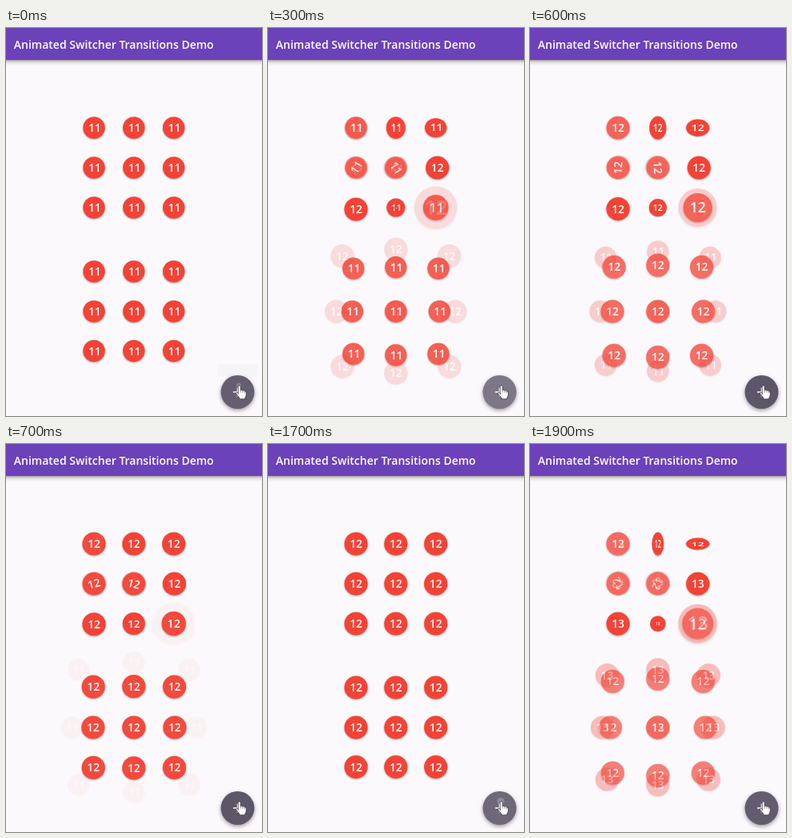
These frames come from a looping animation (320 by 486 pixels, 2000 ms). An HTML page:

```html
<!DOCTYPE html>
<html lang="en">
<head>
<meta charset="utf-8">
<title>Animated Switcher Transitions Demo</title>
<style>
  html, body { margin: 0; width: 100%; height: 100%; overflow: hidden; background: #fbf9fc; }
  svg { display: block; width: 320px; height: 486px; }
  text { font-family: "Open Sans", "Noto Sans", sans-serif; font-weight: 600; fill: #fff; }
  .num { font-size: 13.8px; text-anchor: middle; }
  .disc { fill: #f44336; filter: drop-shadow(0 1px 1px rgba(0, 0, 0, .32)); }
</style>
</head>
<body>
<svg viewBox="0 0 320 486">
  <defs>
    <linearGradient id="shade" x2="0" y2="1">
      <stop offset="0" stop-color="#000" stop-opacity=".34"/>
      <stop offset=".45" stop-color="#000" stop-opacity=".1"/>
      <stop offset="1" stop-color="#000" stop-opacity="0"/>
    </linearGradient>
  </defs>
  <rect width="320" height="486" fill="#fbf9fc"/>
  <rect y="40" width="320" height="7" fill="url(#shade)"/>
  <rect width="320" height="40" fill="#6b42b9"/>
  <text x="9.8" y="26" font-size="14">Animated Switcher Transitions Demo</text>
  <g id="cells"></g>
  <rect id="tip" x="264" y="421" width="51" height="16" rx="2" fill="#4a5a4a" opacity=".03"/>
  <circle cx="289.5" cy="456" r="21" fill="#5d5568" style="filter:drop-shadow(0 2px 2.5px rgba(0,0,0,.38))"/>
  <circle id="glow" cx="289.5" cy="456" r="21" fill="#fff"/>
  <circle id="ripple" cx="291" cy="447.5" fill="#fff"/>
  <path d="M284 456h11M289.5 450.5v11" stroke="#fff" stroke-width="1.6"/>
  <path d="M290.2 458.5V449.3q0-1.6 1.5-1.6t1.5 1.6V453.4q2.2-.7 2.7.6 2-.5 2.4.8 1.9-.2 1.9 1.5v3.2q0 2-1.4 3.6v1.7h-7v-1.5l-4.2-5.2q-.6-1.4.5-1.8 1-.2 2.1 1.2z"
    fill="#fff" stroke="#3a3444" stroke-width=".8" stroke-linejoin="round"/>
  <path d="M293.2 453.6v3M295.9 454.2v2.6M298.3 455v2.2" stroke="#3a3444" stroke-width=".6"/>
</svg>
<script>
const LOOP = 2000, STEP = 100, SECOND_TAP = 1700;
const COLS = [110, 159.8, 209.7], ROWS = [125, 175, 225, 305, 355, 404.5];
const PROGRESS = [[200, 0], [300, .16], [400, .4], [600, .76], [700, .96], [800, 1]];
const PROGRESS_2 = [[1700, 0], [1800, .14], [1900, .33]];
const GLOW = [[0, .05], [200, .1], [300, .2], [400, 0], [1600, 0], [1700, .11], [1800, .18], [1900, .04]];
const RIPPLE = [[0, 3], [200, 5], [300, 0], [1600, 0], [1700, 4.5], [1800, 9], [1900, 0]];

const $ = id => document.getElementById(id);
const { PI, sin, cos, abs } = Math;

function make(tag, parent, attrs = {}) {
  const el = document.createElementNS("http://www.w3.org/2000/svg", tag);
  for (const k in attrs) el.setAttribute(k, attrs[k]);
  return parent.appendChild(el);
}

function track(keys, t) {
  const i = keys.findIndex(k => k[0] >= t);
  if (i < 0) return keys[keys.length - 1][1];
  if (i === 0) return keys[0][1];
  const [t0, a] = keys[i - 1], [t1, b] = keys[i];
  return a + (b - a) * (t - t0) / (t1 - t0);
}

// Each effect maps visibility v (0 hidden, 1 at rest) to a pose; isNew marks the incoming disc.
const fade = v => ({ alpha: v });
const flip = axis => (v, isNew) => {
  const s = abs(cos(PI * v));
  return { alpha: isNew ? +(v >= .5) : +(v > .5), sx: axis ? 1 : s, sy: axis ? s : 1 };
};
const spin = dir => v => ({ alpha: v, turn: dir * 360 * v });
const shake = (dx, dy) => (v, isNew) => {
  const s = 2 * sin(3 * PI * v);
  return { alpha: isNew ? +(v > 0) : +(v === 1), x: dx * s, y: dy * s };
};
const scale = v => ({ sx: v, sy: v });
const zoom = v => ({ alpha: v, sx: 2 - v, sy: 2 - v });
const slide = (dx, dy) => {
  const k = dx && dy ? .7 : 1;
  return v => ({ alpha: v, x: dx * 29 * k * (1 - v), y: dy * 33 * k * (1 - v) });
};

const effects = [fade, flip(0), flip(1), spin(1), spin(-1), shake(1, 0), shake(0, 1), scale, zoom];
for (const dy of [-1, 0, 1])
  for (const dx of [-1, 0, 1]) effects.push(dx || dy ? slide(dx, dy) : fade);

function makeDisc(parent) {
  const g = make("g", parent);
  return { g, disc: make("circle", g, { class: "disc" }), label: make("text", g, { class: "num", y: 5 }) };
}

const cells = effects.map((effect, i) => {
  const x = COLS[i % 3], y = ROWS[Math.floor(i / 3)];
  const g = make("g", $("cells"), { transform: `translate(${x} ${y})` });
  return { effect, before: makeDisc(g), after: makeDisc(g) };
});

function pose(d, n, { alpha = 1, x = 0, y = 0, sx = 1, sy = 1, turn = 0 }) {
  d.label.textContent = n;
  d.label.setAttribute("x", n === 11 ? .8 : 0);
  d.disc.setAttribute("r", n === 11 ? 13.7 : 14.6);
  d.g.setAttribute("opacity", alpha);
  d.g.setAttribute("transform", `translate(${x} ${y}) rotate(${turn}) scale(${sx} ${sy})`);
}

function draw(ms) {
  const t = Math.floor(ms % LOOP / STEP) * STEP;
  const second = t >= SECOND_TAP;
  const n = second ? 12 : 11;
  const p = track(second ? PROGRESS_2 : PROGRESS, t);
  for (const { effect, before, after } of cells) {
    pose(before, n, effect(1 - p, false));
    pose(after, n + 1, effect(p, true));
    before.g.style.display = p < 1 ? "" : "none";
    after.g.style.display = p > 0 ? "" : "none";
  }
  const r = track(RIPPLE, t);
  $("glow").setAttribute("opacity", track(GLOW, t));
  $("ripple").setAttribute("r", r);
  $("ripple").setAttribute("opacity", r > 6 ? .1 : .22);
  $("tip").style.display = t < STEP ? "" : "none";
}

let start;
function tick(now) {
  start ??= now;
  draw(Math.max(0, now - start));
  requestAnimationFrame(tick);
}
draw(0);
requestAnimationFrame(tick);
</script>
</body>
</html>
```
